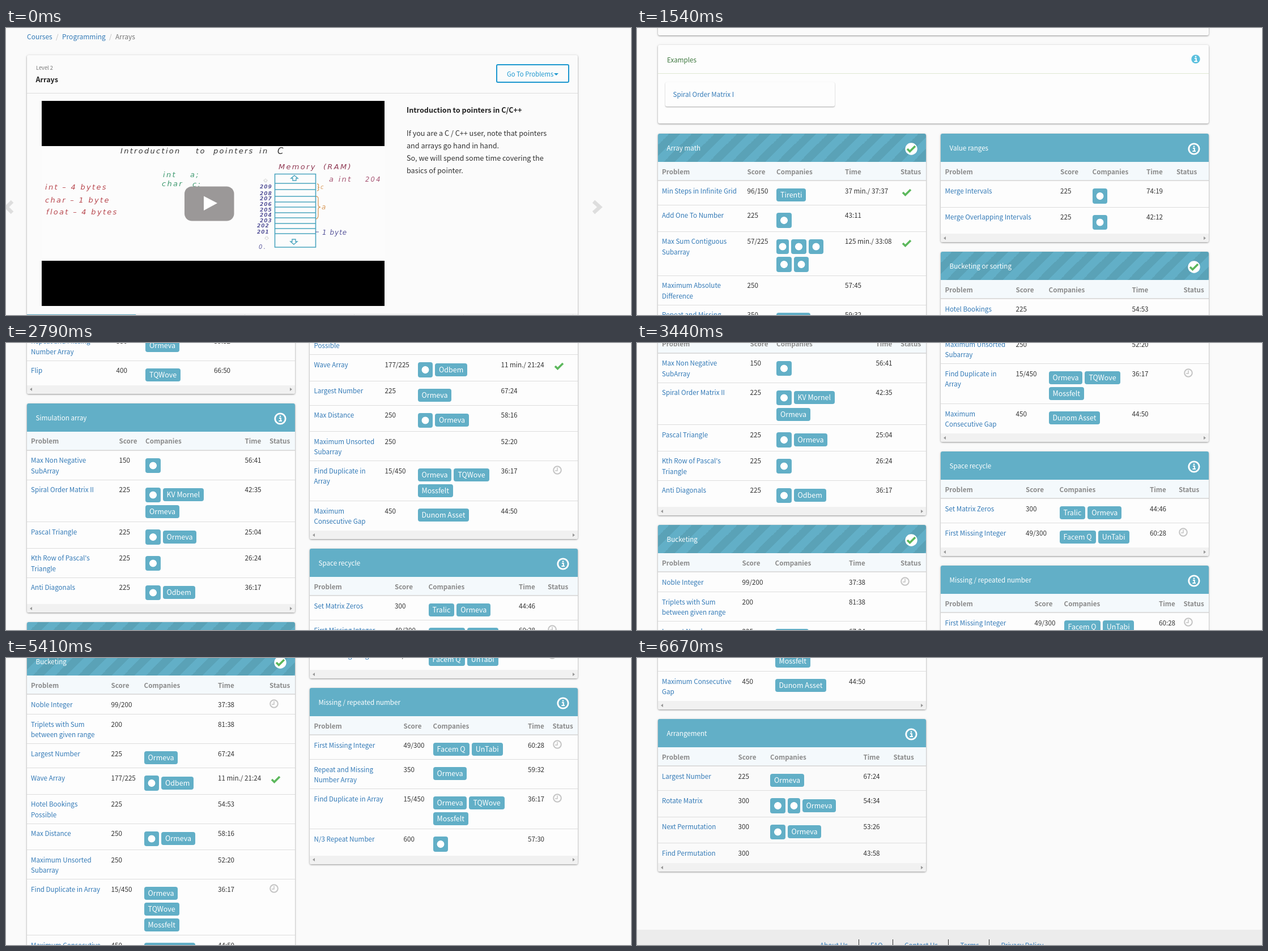
Write an HTML page that moves like this. It is 1103 px wide and 508 px high and loops after 8000 ms.

```html
<!DOCTYPE html>
<html lang="en">
<head>
<meta charset="utf-8">
<title>Arrays course</title>
<style>
html, body { margin: 0; width: 100%; height: 100%; overflow: hidden; background: #fafafa; }
body { position: relative; font: 11.65px/18.5px "Noto Sans CJK SC", "Noto Sans CJK JP", "Noto Sans", sans-serif; color: #333; }
#page { position: absolute; left: 0; top: 0; width: 1103px; height: 2860px; will-change: transform; }
#page * { box-sizing: border-box; }
.abs, .t, .card, .item, .tab { position: absolute; }
.t { white-space: pre; transform: translateY(-50%); }
.link { color: #337ab7; }
.card, .board { background: #fbfbfb; border-radius: 3px; box-shadow: 0 1px 3px rgba(0,0,0,.4), 0 0 6px rgba(0,0,0,.05); }
.card { left: 37px; width: 972px; }
.item { width: 299px; height: 43px; border-radius: 3px; box-shadow: 0 1px 2px rgba(0,0,0,.35); }
.tab { width: 192.75px; height: 46.5px; padding-left: 14px; line-height: 46px; border-right: 1px solid #e4e4e4; white-space: pre; }
.on { background: #62afc7; color: #fff; font-weight: 500; }
.col { position: absolute; top: 976px; width: 473px; }
.board { position: relative; margin-bottom: 17px; background: #fdfdfd; }
.head { position: relative; height: 50px; padding-left: 15.5px; line-height: 50px; color: #fff; font-weight: 500; background: #62afc7; border-radius: 3px 3px 0 0; }
.striped { background: linear-gradient(-45deg, #5aa2b7 25%, #62afc7 25% 50%, #5aa2b7 50% 75%, #62afc7 75%) 0 0/40px 40px; }
.th { position: relative; height: 34px; background: #f4f9fc; border-bottom: 2px solid #ddd; font-weight: bold; color: #8b8b8b; }
.row { position: relative; border-bottom: 1px solid #ddd; }
.row:nth-last-child(2) { border-color: transparent; }
.row > *, .th > * { position: absolute; top: 7.5px; margin-left: -.5px; white-space: pre; }
.row > .firms { top: 13px; }
.line { display: flex; gap: 4px; align-items: center; height: 28px; padding-bottom: 5px; }
.line.tall { height: 31.5px; }
.pill { height: 23px; padding: 0 7px; border-radius: 4px; background: #62afc7; color: #fff; font-size: 12.5px; font-weight: 500; line-height: 22px; }
.logo { width: 26.5px; height: 26.5px; border-radius: 4px; background: radial-gradient(circle, #fff 6px, #62afc7 6.8px); }
.slim { width: 22px; }
.bar { position: relative; height: 15px; background: #f1f1f1; border-radius: 0 0 3px 3px; }
.bar::before, .bar::after { content: ""; position: absolute; top: 4.5px; border: 3px solid transparent; }
.bar::before { left: 2px; border-right: 4px solid #999; }
.bar::after { right: 2px; border-left: 4px solid #999; }
svg { position: absolute; overflow: visible; }
#ink text { font: italic 13px "DejaVu Sans", sans-serif; letter-spacing: 2.3px; }
</style>
</head>
<body>
<div id="page"></div>
<script>
const out = [];
const box = (x, y, w, h, css = '') => out.push(`<div class="abs" style="left:${x}px;top:${y}px;width:${w}px;height:${h}px;${css}"></div>`);
// y is the middle of the line
const text = (s, x, y, cls = '', css = '') => out.push(`<div class="t ${cls}" style="left:${x}px;top:${y}px;${css}">${s}</div>`);
const svg = (x, y, body) => `<svg width="1" height="1" style="left:${x}px;top:${y}px" fill="none">${body}</svg>`;

const letterI = c => `<path d="M-2 -1H.8V4M-2.6 4H3" stroke="${c}" stroke-width="2"/><circle cy="-4.2" r="1.4" fill="${c}"/>`;
const tick = '<path d="M-7 0L-2.5 4.5L7 -5" stroke="#5cb85c" stroke-width="3.6"/>';
const icons = {
  tick,
  done: '<circle r="10.7" fill="#fff"/>' + tick,
  info: '<circle r="9.2" stroke="#fff" stroke-width="2.8"/>' + letterI('#fff'),
  clock: '<circle r="6.8" stroke="#c4c4c4" stroke-width="2"/><path d="M0 -4.5V1H-4" stroke="#c4c4c4" stroke-width="1.5"/>',
  dot: '<circle r="7.7" fill="#5bc0de"/>' + letterI('#fff')
};

// Breadcrumbs and video card
text('Courses', 37, 14.5, 'link', 'font-size:12px');
text('/', 88, 14.5, '', 'color:#bbb');
text('Programming', 99, 14.5, 'link', 'font-size:12px');
text('/', 182, 14.5, '', 'color:#bbb');
text('Arrays', 193, 14.5, '', 'color:#777;font-size:12px');

out.push('<div class="card" style="top:48px;height:598px"></div>');
box(37, 115, 972, 1, 'background:#ddd');
text('Level 2', 53, 70, '', 'color:#777;font-size:9.3px;font-weight:500');
text('Arrays', 52.5, 91, '', 'color:#222;font-size:12.6px;font-weight:bold');
box(865, 64, 128.5, 33, 'border:2px solid #1c97cf;border-radius:3px');
text('Go To Problems', 884, 80.5, '', 'color:#1c97cf;font-size:11.2px');
box(967, 80, 8, 4, 'border:4px solid transparent;border-top-color:#1c97cf;border-bottom:0');
text('Introduction to pointers in C/C++', 707, 145, '', 'font-size:12.65px;font-weight:bold;color:#222');
['If you are a C / C++ user, note that pointers', 'and arrays go hand in hand.', 'So, we will spend some time covering the', 'basics of pointer.']
  .forEach((s, i) => text(s, 707, 186 + 22 * i, '', 'font-size:12.65px'));

box(63, 129, 604.5, 363, 'background:linear-gradient(#000 80px,#fcfcfc 80px 283.5px,#000 283.5px)');

const note = (s, x, y, c, css = '') => `<text x="${x}" y="${y}" fill="${c}" style="${css}">${s}</text>`;
const red = '#b8484f', green = '#3f9a70', blue = '#5a589c', teal = '#4aa5bf', tan = '#d99a5b';
let ink = note('Introduction', 202, 222, '#333') + note('to', 335, 222, '#333') + note('pointers', 366, 222, '#333') +
  note('in', 447, 222, '#333') + note('C', 479, 223, '#333', 'font-size:15px') +
  note('Memory', 481, 250, '#913b55') + note('(RAM)', 560, 250, '#913b55') +
  note('int', 277, 264, green) + note('a;', 325, 264, green) + note('char', 275, 280, green) + note('c;', 329, 281, green) +
  note('int – 4 bytes', 69, 286, red) + note('char – 1 byte', 69, 309, red) + note('float – 4 bytes', 71, 330, red) +
  note('a int', 570, 272, '#a65573') + note('204', 634, 272, '#a65573', 'font-size:11.5px') +
  note('1 byte', 558, 366, blue, 'font-size:12px;letter-spacing:1px') +
  note('c', 555, 285, tan, 'font-size:10px') + note('a', 557, 321, tan, 'font-size:12px');
[284, 295.5, 304.5, 315, 325, 333.5, 344, 353, 364].forEach((y, i) =>
  ink += note(209 - i, i > 6 ? 443 : 448, y, blue, 'font-size:9px;font-weight:bold;letter-spacing:1px'));
ink += note('0.', 446, 391, blue, 'font-size:10px');
const arrow = (x, y, d, c) => `<path d="M${x} ${y - 5 * d}l6 ${5 * d}h-3v${4 * d}h-6v${-4 * d}h-3z" stroke="${c}" stroke-width="1.4"/>`;
ink += arrow(509, 266, 1, teal) + arrow(508, 378, -1, teal) +
  `<g transform="translate(458 270) scale(.6)">${arrow(0, 0, 1, '#ccc')}</g><g transform="translate(460 372) scale(.6)">${arrow(0, 0, -1, '#ccc')}</g>` +
  `<path d="M474.5 258.5H546.5V388H474.5Z${[275, 286, 298, 308, 317, 327, 336, 346, 355, 364].map(y => `M474 ${y}h72`).join('')}" stroke="${teal}" stroke-width="1.6"/>` +
  `<path d="M546 361h6" stroke="${blue}"/><path d="M549 276q4 0 2 5q0 1 2 1q-2 0-2 2q2 4-2 4M547 298q5 0 4 6v9q0 4 4 4q-4 0-4 4v11q0 5-4 6" stroke="${tan}" stroke-width="1.3"/>` +
  '<rect x="315" y="280.5" width="87.5" height="61" rx="13" fill="#9b9898"/><path d="M349 297.5L373 310L349 323Z" fill="#fff"/>';
out.push(`<svg id="ink" width="1" height="1" style="left:0;top:0" fill="none">${ink}</svg>`);
out.push(svg(0, 317, '<path d="M11 -10L1 0L11 10M1037 -10L1048 0L1037 10" stroke="#dedede" stroke-width="6.5"/>'));

// Lesson tabs
box(37, 506, 972, 1, 'background:#e4e4e4');
['Introduction to pointers i...', 'Arrays in programming - f...', 'Pointers and 2-D arrays', 'Pointers and arrays', 'Implementation Details',
  'Introduction to sorting al...', 'Insertion sort algorithm', 'Merge sort algorithm', 'Analysis of Merge sort alg...', 'Quicksort algorithm', 'Sort Implementation De...']
  .forEach((s, i) => out.push(`<div class="tab ${i ? '' : 'on'}" style="left:${36.75 + i % 5 * 192.75}px;top:${506.5 + (i / 5 | 0) * 46.5}px">${i + 1}. ${s}</div>`));

function itemCard(y, title, items, color) {
  out.push(`<div class="card" style="top:${y}px;height:139px;background:${color}"></div>`);
  text(title, 53, y + 25.5, '', 'color:#3c763d');
  box(37, y + 50, 972, 1, 'background:#dfe8d3');
  out.push(svg(986, y + 25, icons.dot));
  items.forEach((s, i) => {
    out.push(`<div class="item" style="left:${49.5 + 324 * i}px;top:${y + 66}px"></div>`);
    text(s, 63.5 + 324 * i, y + 87, 'link');
  });
}
itemCard(663, 'Primers', ['ARRAY_2D', 'ARRAY_BUG', 'ARRAY_IMPL1'], '#fbfbfb');
itemCard(819, 'Examples', ['Spiral Order Matrix I'], '#fdfdfd');

// Problem boards. Firms: o and f are logo tiles, / breaks the line
const firms = { D: 'Tirenti', A: 'Ormeva', V: 'TQWove', B: 'Odbem', J: 'KV Mornel', R: 'Mossfelt', H: 'Dunom Asset', O: 'Tralic', M: 'Facem Q', I: 'UnTabi' };
const tile = k => k == 'o' ? '<i class="logo"></i>' : k == 'f' ? '<i class="logo slim"></i>' : `<span class="pill">${firms[k]}</span>`;

function row(line, cols) {
  const [name, score, codes, time, status] = line.split(';');
  const lines = codes ? codes.split('/') : [];
  const tall = s => /[of]/.test(s);
  const firmH = lines.reduce((h, s) => h + (tall(s) ? 31.5 : 28), 15);
  const height = Math.max(name.includes('|') ? 52 : 35, lines.length ? firmH : 0);
  const cells = [name.replace('|', '\n'), score, '', time].map((s, i) =>
    `<span class="${i ? '' : 'link'}" style="left:${cols[i]}px">${s}</span>`).join('');
  const pills = lines.map(s => `<div class="line ${tall(s) ? 'tall' : ''}">${[...s].map(tile).join('')}</div>`).join('');
  const mark = status ? svg(cols[4] + (status == 'tick' ? 11 : 8), status == 'tick' ? 20 : 16, icons[status]) : '';
  return `<div class="row" style="height:${height}px">${cells}<div class="firms" style="left:${cols[2]}px">${pills}</div>${mark}</div>`;
}

function board(title, done, cols, rows, css = '') {
  const heads = ['Problem', 'Score', 'Companies', 'Time', 'Status'].map((s, i) => `<span style="left:${cols[i]}px">${s}</span>`).join('');
  return `<div class="board" style="${css}"><div class="head ${done ? 'striped' : ''}">${title}${svg(446.5, 27, icons[done ? 'done' : 'info'])}</div>` +
    `<div class="th">${heads}</div>${rows.map(r => row(r, cols)).join('')}<div class="bar"></div></div>`;
}

const wave = 'Wave Array;177/225;oB;11 min./ 21:24;tick', largest = 'Largest Number;225;A;67:24', hotel = 'Hotel Bookings|Possible;225;;54:53',
  distance = 'Max Distance;250;oA;58:16', unsorted = 'Maximum Unsorted|Subarray;250;;52:20', repeat = 'Repeat and Missing|Number Array;350;A;59:32',
  missing = 'First Missing Integer;49/300;MI;60:28;clock';

out.push('<div class="col" style="left:37px">',
  board('Array math', 1, [7.5, 158, 209.5, 330.5, 428.5], [
    'Min Steps in Infinite Grid;96/150;D;37 min./ 37:37;tick', 'Add One To Number;225;o;43:11',
    'Max Sum Contiguous|Subarray;57/225;foo/oo;125 min./ 33:08;tick', 'Maximum Absolute|Difference;250;;57:45', repeat, 'Flip;400;V;66:50']),
  board('Simulation array', 0, [7.5, 163, 209.5, 385, 428.5], [
    'Max Non Negative|SubArray;150;o;56:41', 'Spiral Order Matrix II;225;oJ/A;42:35', 'Pascal Triangle;225;oA;25:04',
    "Kth Row of Pascal's|Triangle;225;o;26:24", 'Anti Diagonals;225;oB;36:17']),
  board('Bucketing', 1, [7.5, 149, 207, 337.5, 428.5], [
    'Noble Integer;99/200;;37:38;clock', 'Triplets with Sum|between given range;200;;81:38', largest, wave, hotel, distance, unsorted,
    'Find Duplicate in Array;15/450;A/V/R;36:17;clock', 'Maximum Consecutive|Gap;450;H;44:50']),
  board('Arrangement', 0, [7.5, 142, 198.5, 363, 416], [
    largest, 'Rotate Matrix;300;ofA;54:34', 'Next Permutation;300;oA;53:26', 'Find Permutation;300;;43:58'], 'background:#fafafa'),
  '</div><div class="col" style="left:536px">',
  board('Value ranges', 0, [8, 211.5, 268, 363.5, 416.5], ['Merge Intervals;225;o;74:19', 'Merge Overlapping Intervals;225;o;42:12']),
  board('Bucketing or sorting', 1, [8, 133, 191, 338, 429], [
    hotel, wave, largest, distance, unsorted, 'Find Duplicate in|Array;15/450;AV/R;36:17;clock', 'Maximum|Consecutive Gap;450;H;44:50']),
  board('Space recycle', 0, [8, 150.5, 210, 369.5, 420.5], ['Set Matrix Zeros;300;OA;44:46', missing]),
  board('Missing / repeated number', 0, [8, 166, 218, 385.5, 429], [
    missing, repeat, 'Find Duplicate in Array;15/450;AV/R;36:17;clock', 'N/3 Repeat Number;600;o;57:30']),
  '</div>');

// Footer
box(0, 2761, 1103, 99, 'background:#ececec');
[['About Us', 323], ['FAQ', 412], ['Contact Us', 472], ['Terms', 570.5], ['Privacy Policy', 642.5]].forEach(([s, x]) => text(s, x, 2787.5, 'link'));
[391, 451, 549, 621].forEach(x => box(x, 2778, 1, 20, 'background:#333'));

const page = document.getElementById('page');
page.innerHTML = out.join('');

// Scroll offset from each moment on
const steps = [[0, 0], [500, 130], [650, 300], [800, 372], [960, 440], [1110, 530], [1260, 620], [1390, 710], [1540, 789],
  [1810, 860], [1940, 960], [2090, 1028], [2240, 1052], [2520, 1100], [2670, 1210], [2790, 1300], [2910, 1340],
  [3290, 1390], [3440, 1472], [3560, 1525], [3710, 1540], [3960, 1600], [4110, 1680], [4260, 1720],
  [5410, 1813], [5530, 1930], [5680, 2060], [5810, 2132], [6370, 2165], [6520, 2230], [6670, 2280]];
function frame() {
  const t = performance.now() % 8000;
  page.style.transform = `translateY(${-steps.findLast(s => s[0] <= t)[1]}px)`;
  requestAnimationFrame(frame);
}
frame();
</script>
</body>
</html>
```
